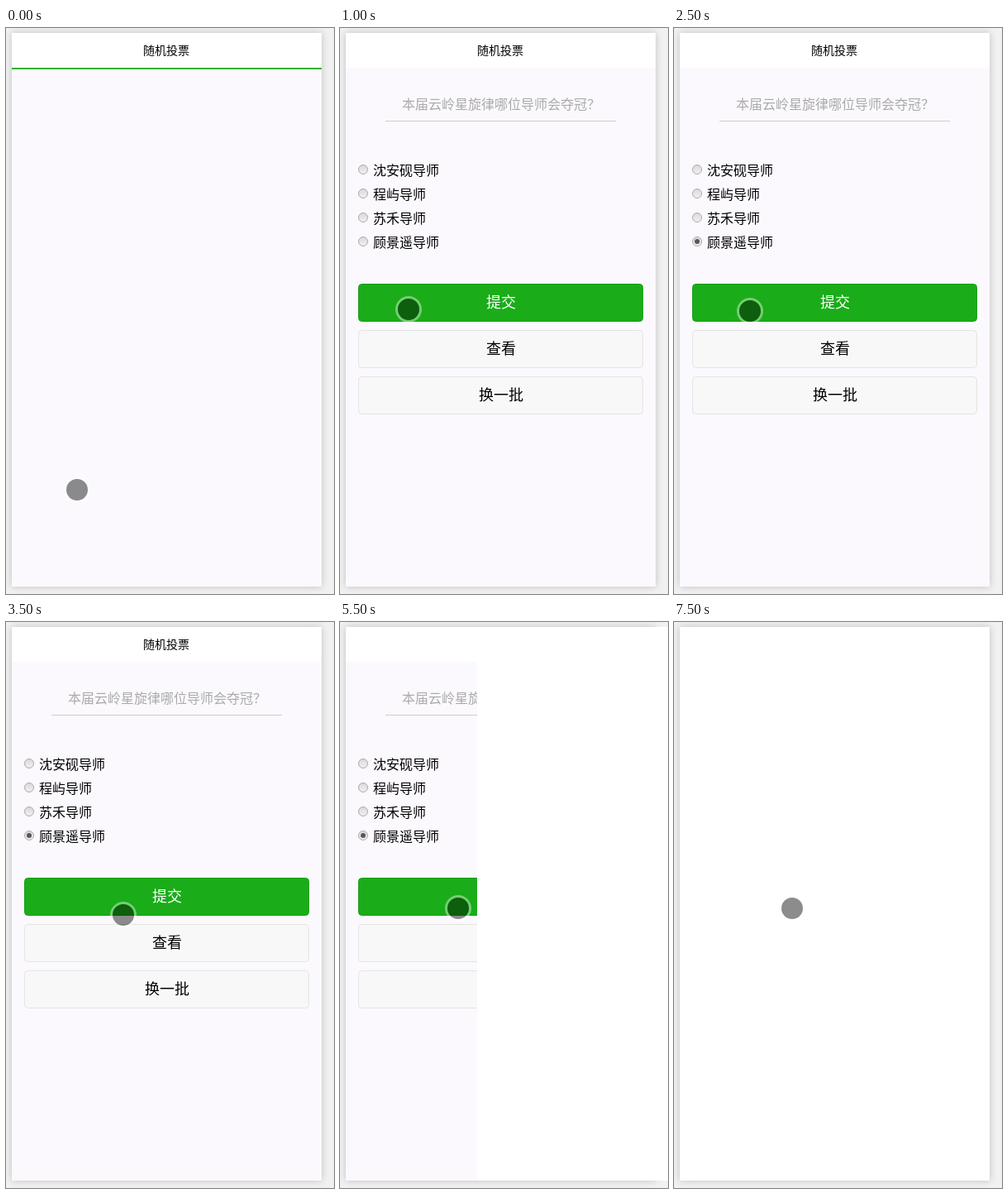
Animation of 397 by 684 pixels, one loop 8 s. Source, as an HTML page:

```html
<!DOCTYPE html>
<html lang="zh">
<head>
<meta charset="utf-8">
<style>
  html, body { margin: 0; width: 100%; height: 100%; overflow: hidden; background: #f1f1f1; }
  .stage { position: relative; width: 397px; height: 684px; overflow: hidden; }
  .card { position: absolute; left: 7px; top: 6px; width: 375px; height: 669px;
          background: #fbf9fe; box-shadow: 0 0 9px rgba(0, 0, 0, .2); }
  svg { position: absolute; left: 0; top: 0; }
  text { font-family: "Noto Sans CJK SC", "Noto Sans CJK", sans-serif; font-weight: 300; }
</style>
</head>
<body>
<div class="stage">
  <div class="card"></div>
  <svg width="397" height="684">
    <defs>
      <linearGradient id="shade" x2="0" y2="1">
        <stop stop-color="#d9d9d9"/><stop offset="1" stop-color="#f2f2f2"/>
      </linearGradient>
    </defs>
    <rect x="7" y="6" width="375" height="42" fill="#fff"/>
    <g id="title"></g>
    <rect id="progress" x="7" y="48" width="375" height="2" fill="#35b035"/>
    <g id="form"></g>
    <rect id="nextPage" y="6" height="669" fill="#fff"/>
    <g id="cursor">
      <circle r="14.5" fill="none" stroke="#fff" stroke-opacity=".4" stroke-width="3"/>
      <circle r="13" fill="#000" fill-opacity=".45"/>
    </g>
  </svg>
</div>
<script>
const $ = id => document.getElementById(id);

// Text placed by the middle of its em box, on a whole-pixel baseline
const label = (str, x, y, size, fill = '#000', anchor = 'middle') =>
  `<text x="${x}" y="${Math.floor(y + size * .38)}" font-size="${size}" fill="${fill}" text-anchor="${anchor}">${str}</text>`;

const button = (str, y, fill, ink, border, id = '') =>
  `<rect id="${id}" x="22.5" y="${y + .5}" width="344" height="45" rx="4" fill="${fill}" stroke="${border}"/>` +
  label(str, 195, y + 22.5, 18, ink);

const option = (str, i) => {
  const y = 171 + i * 29;
  return `<circle cx="28" cy="${y}" r="5.5" fill="url(#shade)" stroke="#aaa"/>` +
    (i === 3 ? `<circle id="dot" cx="28" cy="${y}" r="3" fill="#585858"/>` : '') +
    label(str, 40, y + 1, 16, '#000', 'start');
};

$('title').innerHTML = label('随机投票', 194, 27, 14);
$('form').innerHTML =
  label('本届云岭星旋律哪位导师会夺冠？', 75, 92, 16, '#aaa', 'start') +
  '<rect x="55" y="112" width="279" height="1" fill="#ccc"/>' +
  ['沈安砚导师', '程屿导师', '苏禾导师', '顾景遥导师'].map(option).join('') +
  button('提交', 309, '#1aad19', '#fff', '#179e17', 'submit') +
  button('查看', 365, '#f8f8f8', '#000', '#e2e4e2') +
  button('换一批', 421, '#f8f8f8', '#000', '#e2e4e2');

// The screen refreshes twice a second
const STEP = 500, STEPS = 16;
const path = [[86, 558], [84, 442], [83, 340], [55, 304], [31, 274], [92, 342], [138, 351], [142, 354], [143, 346]];
const slide = { 10: 300, 11: 166, 12: 42, 13: 7 };

function draw(now) {
  const n = Math.floor(now / STEP) % STEPS;
  const show = (id, on) => $(id).setAttribute('visibility', on ? 'visible' : 'hidden');
  const [x, y] = path[Math.min(n, path.length - 1)];
  const left = slide[n] ?? 7, right = n < 14 ? 397 : 382;

  $('cursor').setAttribute('transform', `translate(${x} ${y})`);
  show('progress', n < 2);
  show('form', n > 0);
  $('dot').setAttribute('opacity', n > 4 ? 1 : 0);
  $('submit').setAttribute('fill', n === 8 || n === 9 ? '#179b16' : '#1aad19');
  show('nextPage', n > 9);
  $('nextPage').setAttribute('x', left);
  $('nextPage').setAttribute('width', right - left);
}

const start = performance.now();
function tick() {
  draw(performance.now() - start);
  requestAnimationFrame(tick);
}
tick();
</script>
</body>
</html>
```
